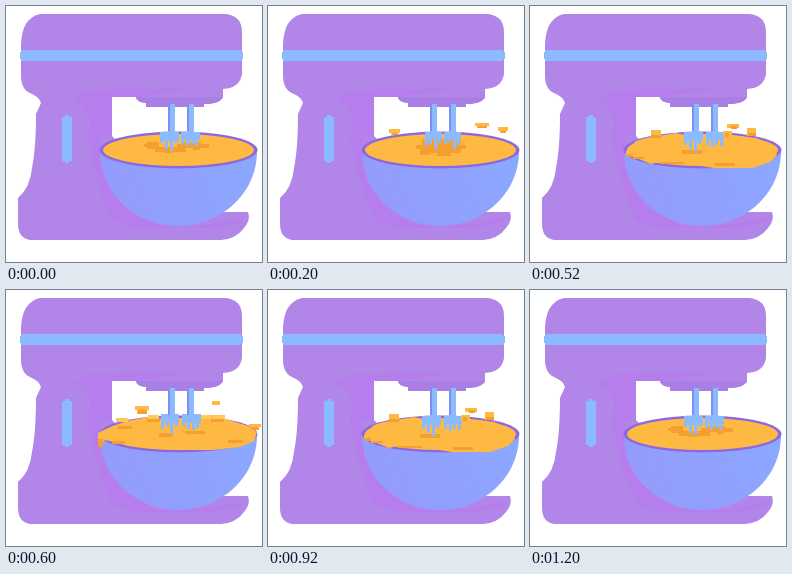
Write an HTML page with a canvas that moves like this. It is 256 px wide and 256 px high and loops after 1400 ms.

```html
<!DOCTYPE html>
<html lang="en">
<head>
<meta charset="utf-8">
<title>Stand mixer</title>
<style>
  html, body { margin: 0; height: 100%; overflow: hidden; background: #fff; }
  canvas { display: block; width: 100vw; height: 100vh; image-rendering: pixelated; }
</style>
</head>
<body>
<canvas width="256" height="256"></canvas>
<script>
  const ctx = document.querySelector('canvas').getContext('2d');
  const body = '#b186e8', shade = '#b57eec', deep = '#a97fe6';
  const blue = '#8bbaff', edge = '#7f8df4', rim = '#8d68e0';
  const batter = '#fdb942', dark = '#f59f30', light = '#ffc85b';

  function fill(color, path) {
    ctx.fillStyle = color;
    ctx.fill(new Path2D(path));
  }

  function oval(color, x, y, rx, ry) {
    ctx.fillStyle = color;
    ctx.beginPath();
    ctx.ellipse(x, y, rx, ry, 0, 0, 2 * Math.PI);
    ctx.fill();
  }

  // Boxes: [x, y, width, height]
  function boxes(color, ...list) {
    ctx.fillStyle = color;
    list.forEach(box => ctx.fillRect(...box));
  }

  // Drop with a narrower, darker underside
  function drop(x, y, w, h, lip = 2) {
    boxes(batter, [x, y, w, h - lip], [x + 2, y + h - lip, w - 4, lip]);
    boxes(dark, [x + 3, y + h - lip, w - 5, lip]);
  }

  // Beater head: a bar with tines of given heights
  function head(x, y, w, bar, tines) {
    boxes(blue, [x, y, w, bar]);
    const step = w / tines.length;
    tines.forEach((h, i) => boxes(blue, [Math.round(x + i * step), y + bar, 3, h]));
  }

  function machine() {
    fill(body, 'M 34 8 H 220 Q 236 10 236 26 V 68 Q 234 82 217 83 V 91 Q 214 98 198 98 V 101 H 140 V 97 Q 130 96 130 91 H 106 V 130 L 180 206 H 242 Q 245 214 238 222 Q 230 233 215 234 H 24 Q 12 232 12 218 V 192 Q 24 182 26 162 Q 30 142 30 108 L 35 97 Q 33 91 26 88 Q 15 84 15 70 V 38 Q 16 12 34 8 Z');
    fill(shade, 'M 66 94 L 84 84 L 190 82 L 130 91 H 106 V 130 H 95 Q 96 190 150 219 H 200 L 238 211 Q 238 220 200 222 H 126 L 106 214 Q 90 180 82 130 Q 90 100 66 94 Z');
    fill(deep, 'M 130 91 H 217 Q 214 98 198 98 V 101 H 140 V 97 Q 130 96 130 91 Z');
    boxes(blue, [15, 44, 220, 11], [14, 46, 223, 7], [59, 109, 4, 48], [56, 111, 10, 44]);
  }

  function bowl() {
    const glaze = ctx.createLinearGradient(100, 205, 245, 150);
    glaze.addColorStop(0, '#959bfb');
    glaze.addColorStop(0.55, '#90a1fd');
    glaze.addColorStop(1, '#8ba8ff');
    fill(glaze, 'M 94 145 C 94 189 131 220 172 220 S 251 189 251 145 Z');
    oval(rim, 172.5, 144, 79, 18.5);
    oval(batter, 172.5, 144, 75.5, 16);
  }

  function calm() {
    boxes(dark, [141, 136, 12, 7], [138, 138, 15, 3], [149, 141, 31, 5], [158, 144, 10, 3],
      [171, 138, 32, 4], [176, 136, 19, 2], [187, 142, 7, 2]);
    head(154, 126, 19, 9, [2, 8, 10, 2]);
    head(175, 126, 19, 8, [4, 6, 4, 6]);
  }

  function stirred() {
    boxes(dark, [154, 133, 39, 14], [148, 139, 50, 4], [152, 143, 11, 6], [169, 146, 14, 4]);
    head(157, 126, 17, 7, [7, 5, 10, 4]);
    head(176, 126, 17, 7, [5, 3, 10, 6]);
    drop(121, 123, 11, 6);
    drop(207, 117, 14, 5);
    drop(230, 121, 10, 6);
  }

  function risen() {
    fill(batter, 'M 96 145 L 106 135 L 116 132 L 146 127 L 157 130 L 195 128 L 226 132 L 244 140 L 247 149 L 240 156 L 222 162 H 184 L 165 159 L 129 156 L 121 158 L 109 153 L 96 149 Z');
    boxes(dark, [97, 148, 6, 3], [103, 151, 12, 2], [130, 156, 24, 2], [152, 144, 20, 4], [185, 157, 20, 3]);
    head(154, 126, 19, 9, [4, 8, 11, 3]);
    head(176, 126, 18, 8, [5, 7, 5, 6]);
    boxes(batter, [121, 124, 10, 8], [197, 118, 12, 4], [193, 125, 9, 6], [217, 122, 9, 8]);
    boxes(dark, [121, 129, 10, 3], [201, 120, 6, 3], [195, 127, 4, 4], [218, 127, 8, 3]);
  }

  function splashed() {
    fill(batter, 'M 92 143 L 102 138 L 121 131 L 147 126 L 156 130 L 207 125 L 242 136 L 251 142 L 248 151 L 234 157 L 207 160 H 170 L 126 156 L 104 151 L 98 150 L 96 157 H 92 Z');
    boxes(dark, [92, 149, 5, 8], [112, 136, 14, 3], [141, 129, 13, 3], [153, 143, 14, 4],
      [179, 141, 20, 3], [205, 129, 13, 3], [222, 150, 15, 3], [106, 151, 13, 3]);
    boxes(light, [110, 128, 12, 4], [142, 125, 11, 4], [194, 125, 12, 4], [207, 125, 12, 4]);
    head(155, 124, 18, 9, [6, 3, 11, 4]);
    head(176, 124, 19, 9, [3, 6, 7, 5]);
    drop(129, 116, 14, 8, 4);
    boxes(batter, [206, 111, 8, 4]);
    drop(243, 134, 12, 6, 3);
  }

  function stems() {
    [162, 181].forEach(x => {
      boxes(blue, [x, 98, 7, 29]);
      boxes(edge, [x, 98, 2, 27]);
    });
  }

  const order = [calm, stirred, risen, splashed, risen, stirred, calm];
  const stepMs = 200;

  function draw() {
    ctx.clearRect(0, 0, 256, 256);
    machine();
    bowl();
    order[Math.floor(performance.now() / stepMs) % order.length]();
    stems();
    requestAnimationFrame(draw);
  }
  draw();
</script>
</body>
</html>
```
